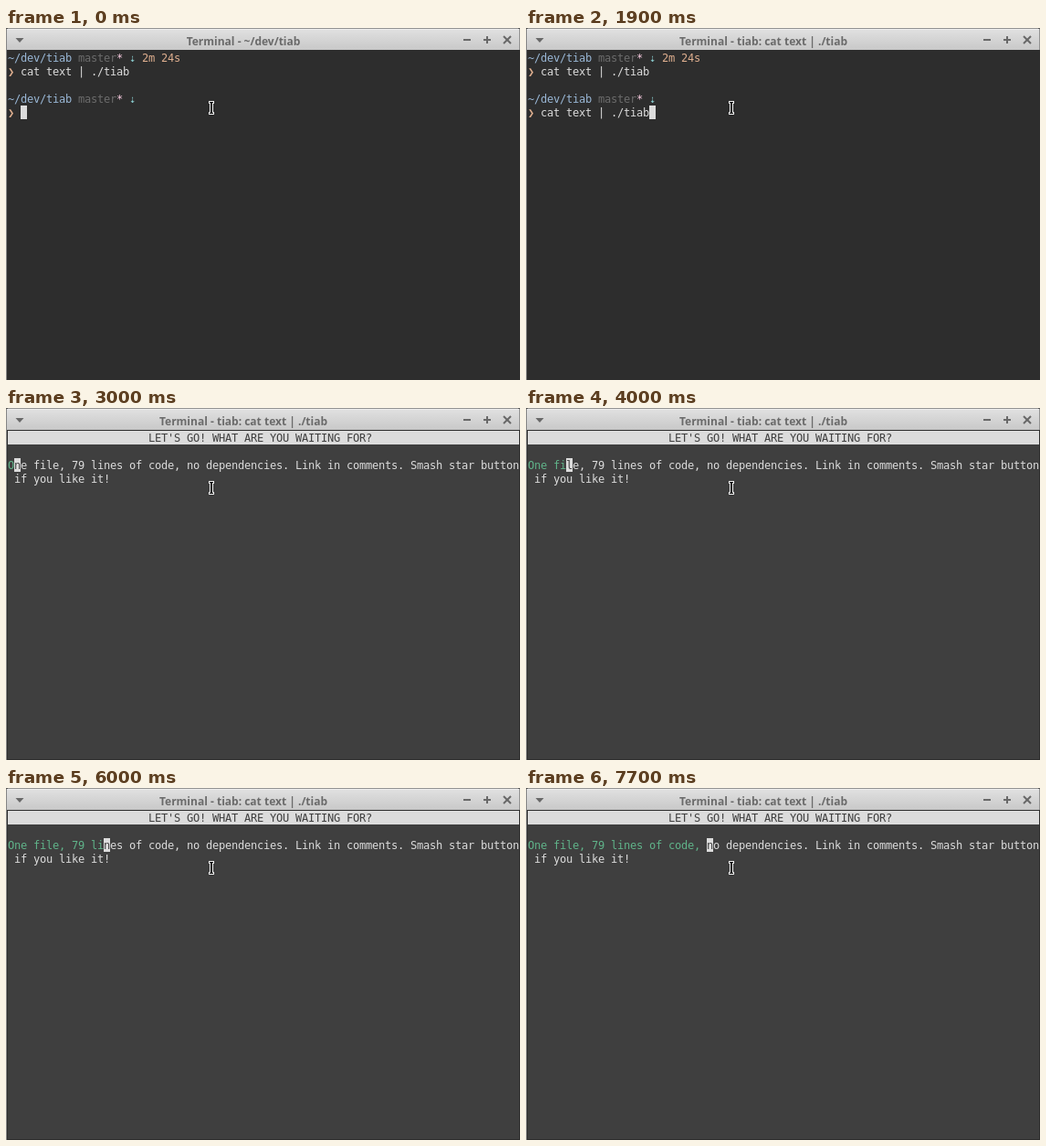
An HTML page with a canvas that plays this animation: 563 px wide and 386 px high, repeating every 8 s.

```html
<!DOCTYPE html>
<html lang="en">
<head>
<meta charset="utf-8">
<title>Terminal</title>
<style>
html, body { margin: 0; width: 100%; height: 100%; overflow: hidden; background: #2d2d2d; }
canvas { display: block; }
</style>
</head>
<body>
<canvas id="stage" width="563" height="386"></canvas>
<script>
const ctx = document.getElementById('stage').getContext('2d');
const LOOP = 8000;
const CELL_W = 7, CELL_H = 15, LEFT = 2, TOP = 25;
const COLORS = {
  back: '#2d2d2d', black: '#3f3f3f', white: '#dcdcdc', green: '#60b48a',
  yellow: '#dfaf8f', blue: '#9ab8d7', cyan: '#8cd0d3', gray: '#6c6c6c',
  pink: '#ffd0e6', icon: '#686868'
};
const COMMAND = 'cat text | ./tiab';
const HEADING = "LET'S GO! WHAT ARE YOU WAITING FOR?";
const LINES = [
  'One file, 79 lines of code, no dependencies. Link in comments. Smash star button',
  ' if you like it!'
];
// One entry per typed character; repeats are typed within one refresh.
const KEYS = [
  3000, 3300, 3400, 3500, 4000, 4000, 4300, 4300, 4500, 4600, 5100, 5300, 5700, 5900,
  6000, 6200, 6300, 6400, 6500, 6700, 6800, 6900, 7100, 7200, 7400, 7500, 7600, 7700
];

function rect(x, y, w, h, color) {
  ctx.fillStyle = color;
  ctx.fillRect(x, y, w, h);
}

function write(text, col, row, color) {
  ctx.font = '12px "DejaVu Sans Mono", monospace';
  ctx.textAlign = 'left';
  ctx.fillStyle = color;
  [...text].forEach((ch, i) => {
    ctx.fillText(ch, LEFT + (col + i) * CELL_W, TOP + row * CELL_H + 12);
  });
}

function block(col, row, cols = 1) {
  rect(LEFT + col * CELL_W, TOP + row * CELL_H, cols * CELL_W, CELL_H, COLORS.white);
}

function line(points, width) {
  ctx.strokeStyle = COLORS.icon;
  ctx.lineWidth = width;
  ctx.beginPath();
  points.forEach(([x, y], i) => i ? ctx.lineTo(x, y) : ctx.moveTo(x, y));
  ctx.stroke();
}

function drawWindow(title) {
  rect(0, 0, 563, 386, COLORS.back);
  const shade = ctx.createLinearGradient(0, 0, 0, 24);
  shade.addColorStop(0, '#e2e2e2');
  shade.addColorStop(1, '#c8c8c8');
  rect(0, 0, 563, 24, shade);
  rect(0, 0, 563, 1, '#929292');
  rect(1, 1, 561, 1, '#ededed');
  rect(0, 0, 1, 386, '#858585');
  rect(562, 0, 1, 24, '#929292');
  rect(0, 0, 2, 1, '#555');
  rect(561, 0, 2, 1, '#555');

  ctx.fillStyle = COLORS.icon;
  ctx.beginPath();
  ctx.moveTo(10.5, 11);
  ctx.lineTo(19.5, 11);
  ctx.lineTo(15, 16);
  ctx.fill();

  rect(501, 12, 8, 2, COLORS.icon);
  rect(523, 12, 8, 2, COLORS.icon);
  rect(526, 9, 2, 8, COLORS.icon);
  line([[545, 9], [553, 17]], 2);
  line([[553, 9], [545, 17]], 2);

  ctx.font = 'bold 12px "Open Sans", sans-serif';
  ctx.textAlign = 'center';
  ctx.fillStyle = '#6a6a6a';
  ctx.fillText('Terminal - ' + title, 260, 19);
}

function drawPrompt(row) {
  write('~/dev/tiab', 0, row, COLORS.blue);
  write('master', 11, row, COLORS.gray);
  write('*', 17, row, COLORS.pink);
  write('⇣', 19, row, COLORS.cyan);
  write('❯', 0, row + 1, COLORS.yellow);
}

function drawShell(typed) {
  drawPrompt(0);
  write('2m 24s', 21, 0, COLORS.yellow);
  write(COMMAND, 2, 1, COLORS.white);
  drawPrompt(3);
  write(typed, 2, 4, COLORS.white);
  block(2 + typed.length, 4);
}

function drawTrainer(count) {
  rect(LEFT, TOP, 560, 360, COLORS.black);
  block(0, 0, 80);
  write(HEADING, 22, 0, COLORS.black);
  write(LINES[0].slice(0, count), 0, 2, COLORS.green);
  block(count, 2);
  write(LINES[0][count], count, 2, COLORS.black);
  write(LINES[0].slice(count + 1), count + 1, 2, COLORS.white);
  write(LINES[1], 0, 3, COLORS.white);
}

function drawPointer() {
  rect(222, 80, 6, 3, '#f4f4f4');
  rect(222, 92, 6, 3, '#f4f4f4');
  rect(223, 81, 4, 13, '#f4f4f4');
  rect(223, 81, 4, 1, '#000');
  rect(223, 93, 4, 1, '#000');
  rect(224, 82, 2, 11, '#000');
}

function frame() {
  const t = performance.now() % LOOP;
  drawWindow(t < 1900 ? '~/dev/tiab' : 'tiab: ' + COMMAND);
  if (t < 2000) drawShell(t < 900 ? '' : COMMAND);
  else drawTrainer(KEYS.filter(at => at <= t).length);
  drawPointer();
  requestAnimationFrame(frame);
}

frame();
</script>
</body>
</html>
```
